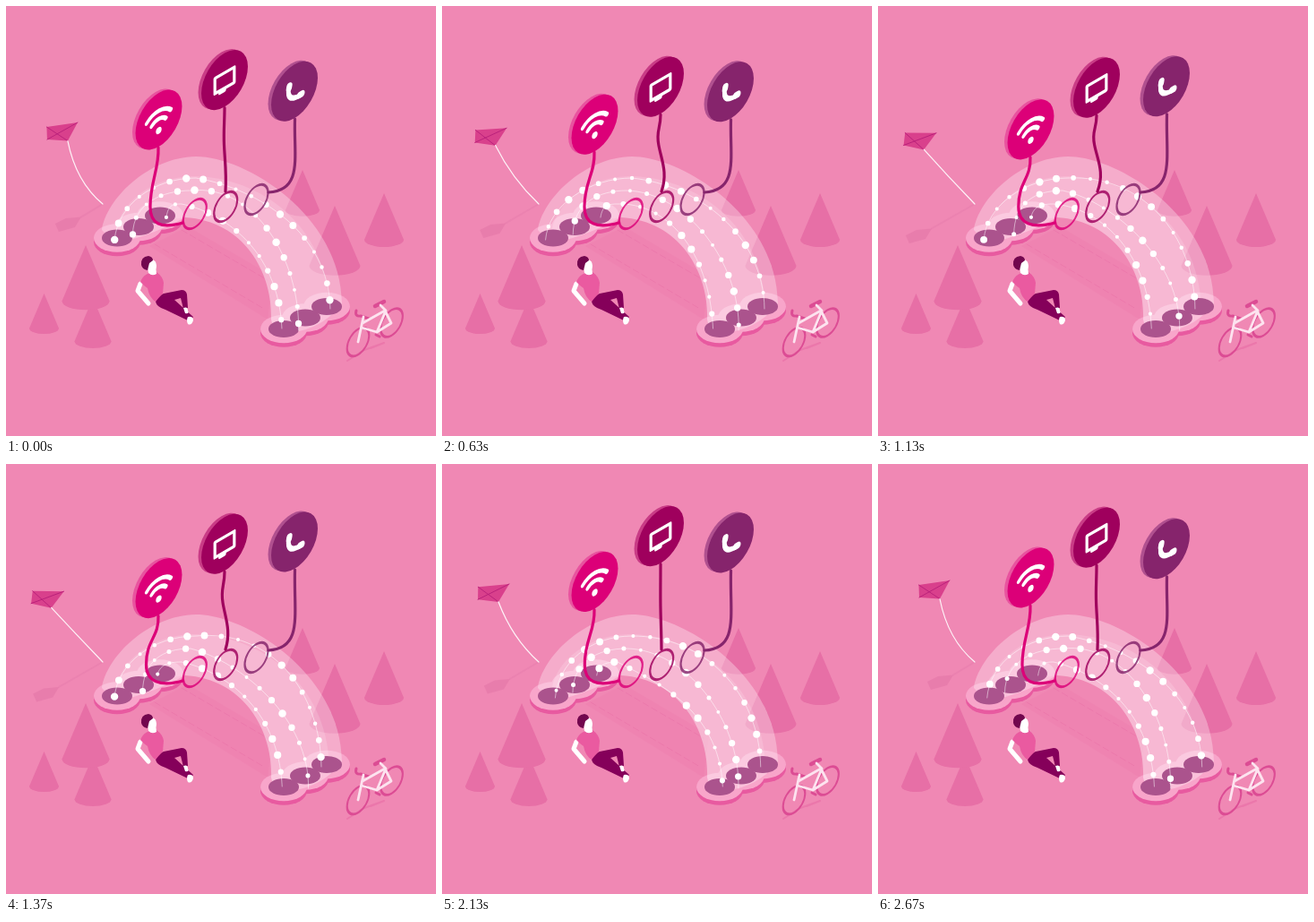
An HTML page for the animation above (2710 ms loop, 480 px wide and 480 px high).

```html
<!DOCTYPE html>
<html lang="en">
<head>
<meta charset="utf-8">
<title>Connected park</title>
<style>
html, body { margin: 0; width: 100%; height: 100%; overflow: hidden; background: #f088b4; }
svg { display: block; width: 100vw; height: 100vh; }
.line { fill: none; stroke-linecap: round; stroke-linejoin: round; }
.white { stroke: #fff; }
.tree { fill: #e76fa6; }
.cord { stroke-width: 3.2; }
</style>
</head>
<body>
<svg viewBox="0 0 480 480">
  <rect width="480" height="480" fill="#f088b4"/>
  <g id="trees"></g>

  <!-- ground shade -->
  <path d="M160 268L203 246L298 302L292 350Z" fill="#d9468f" opacity=".07"/>
  <path class="line" d="M196 250L292 306M166 266L288 338" stroke="#d9468f" stroke-dasharray="7 4" opacity=".16"/>

  <g id="rims"></g>

  <!-- tunnel -->
  <path fill="#fff" opacity=".3" d="M107 250C112 216 158 169 212 168C268 168 374 234 375 332Q350 366 300 366L296 350C298 298 266 240 200 236Q150 262 120 264Z"/>
  <path fill="#fff" opacity=".15" d="M122 259C122 224 160 190 212 190C284 192 358 245 361 336L300 366L296 350C298 298 266 240 200 236Q165 240 150 253Z"/>

  <g id="holes"></g>
  <g id="strands"></g>
  <g id="rings"></g>

  <!-- kite -->
  <g id="shade" fill="#e57aaa" opacity=".75"><path d="M55 243L67 237L84 235.500L77 247L59 252Z"/></g>
  <path id="shadeLine" class="line" stroke="#e57aaa" stroke-width="2" opacity=".45"/>
  <g id="kite">
    <path fill="#d9408c" d="M-14.500 -6L20 -11L9 9.500L-14 8Z"/>
    <path class="line" stroke="#b8207a" stroke-width=".9" d="M-14 8L20 -11M-14.500 -6L9 9.500"/>
  </g>
  <path id="twine" class="line white" stroke-width="1.2" opacity=".9"/>

  <g id="balloons"></g>

  <!-- person -->
  <g>
    <path class="line white" stroke-width="5" d="M150 310L147 318L159 332"/>
    <path fill="#85005a" d="M167 330Q170 321 181 320L196 317Q201 317 202 322L203 337L198 338L195 326L188 328L209 347L205 352L178 339Q168 336 167 330Z"/>
    <path fill="#ea5aa0" d="M150 308Q154 297 168 297Q175 302 176 309L175 321Q170 326 167 330Q160 326 158 315L154 312Z"/>
    <path fill="#fff" d="M158 291L167 290L168 299Q163 302 159 298Z"/>
    <ellipse cx="163" cy="290" rx="5" ry="6.800" fill="#fff"/>
    <path fill="#72074e" d="M151 289Q150 280 159 279Q164 280 164 284L160 287L158 295Q152 294 151 289Z"/>
    <path fill="#fff" d="M198 337Q203 335 203 340Q205 344 200 343ZM203 347Q209 346 209 351Q207 357 203 355Q201 351 203 347Z"/>
  </g>

  <!-- bike -->
  <path class="line" stroke="#d9468f" stroke-width="2" opacity=".25" d="M381 396L400 384L422 376L407 382"/>
  <g class="line" stroke="#dc4c94" stroke-width="2.5">
    <circle r="14.200" transform="matrix(.866 -.5 0 1 393 375)"/>
    <circle r="14.200" transform="matrix(.866 -.5 0 1 430.500 353.500)"/>
    <path d="M391 340Q389 347 396 346L405 349" stroke-width="3"/>
    <path d="M412 335L422 330" stroke-width="4.5"/>
    <path d="M413 367L417 369" stroke-width="3"/>
  </g>
  <path class="line" stroke="#fde3ef" stroke-width="2.8" d="M399 347L393 375M398 354L423 340M397 359L414 364L424 340L418 334M414 364L430 354L423 340"/>
</svg>

<script>
const LOOP = 2710, PITCH = 19, RUN = 6;
const ISO = 'matrix(.866 -.5 0 1 ';
const $ = id => document.getElementById(id);
const add = (id, markup) => $(id).insertAdjacentHTML('beforeend', markup);
const set = (id, d) => $(id).setAttribute('d', d);

// 1 at the peak time, -1 half a loop later
const wave = (t, peak) => Math.cos((t - peak) / LOOP * 2 * Math.PI);

function tree(x, y, w) {
  const base = y + 2.35 * w;
  add('trees', `<path class="tree" d="M${x} ${y}L${x + w} ${base}A${w} ${w * .38} 0 0 1 ${x - w} ${base}Z"/>`);
}
tree(331, 183, 19);
tree(367, 223, 28.5);
tree(422, 209, 22);
tree(97, 326, 20.5);
tree(89, 267, 26.5);
tree(42.5, 321, 16.5);

// a pit is three overlapping lobes on a slanted line
function lobes(id, x, y, grow, fill) {
  for (const n of [-1, 0, 1])
    add(id, `<ellipse cx="${x + n * 24}" cy="${y - n * 12.5}" rx="${17 + grow}" ry="${9.5 + grow * .7}" fill="${fill}"/>`);
}
function pit(x, y) {
  lobes('rims', x, y + 4.5, 9, '#e85aa0');
  lobes('rims', x, y, 9, '#f8a5ca');
  lobes('holes', x, y, 0, '#ab538d');
}
pit(148, 246.5);
pit(334, 348);

// Each strand rises from one pit, passes a crown and drops into the other.
// Both feet sway; bead sizes swell and shrink along the strand.
const strands = [
  { foot: [121, 261], rise: [124, 222], lead: 47, crown: [212, 192], top: [290, 194], drop: [356, 255], end: [357, 338],
    peaks: [2050, 200], swell: .3 },
  { foot: [147, 255], rise: [147, 220], lead: 31, crown: [206, 206], top: [270, 209], drop: [334, 285], end: [332, 362],
    peaks: [1370, 1370], swell: 5 },
  { foot: [174, 236], rise: [176, 222], lead: 10, crown: [196, 221], top: [240, 230], drop: [304, 270], end: [308, 360],
    peaks: [200, 2030], swell: 3.5 }
];
for (const s of strands) {
  const thread = `<path class="line white" stroke-width="1" opacity=".5"/>`;
  const beads = Array.from({ length: RUN }, (_, i) => {
    const size = 6.2 + 2.3 * Math.cos((i - s.swell) / RUN * 2 * Math.PI);
    return `<path class="line white" stroke-width="${size}" stroke-dasharray="0 ${RUN * PITCH}"/>`;
  });
  add('strands', `<g>${thread}${beads.join('')}</g>`);
  s.paths = [...$('strands').lastChild.children];
}

function strandPath(s, t) {
  const [a, b] = s.peaks.map(p => 5.5 * wave(t, p));
  const shift = ([x, y], dx, dy = 0) => [x + dx, y + dy];
  const [cx, cy] = s.crown;
  return `M${shift(s.foot, a)}C${shift(s.rise, a)} ${cx - s.lead} ${cy} ${s.crown}` +
    `C${shift(s.top, -1.5 * b, 2 * b)} ${shift(s.drop, b)} ${shift(s.end, b)}`;
}

function drawStrands(t) {
  const run = t / LOOP * 2 * RUN * PITCH;
  for (const s of strands) {
    const d = strandPath(s, t);
    s.paths.forEach((p, i) => {
      p.setAttribute('d', d);
      if (i) p.style.strokeDashoffset = -(run + (i - 1) * PITCH);
    });
  }
}

const arc = r => {
  const q = r * Math.SQRT1_2;
  return `M${-q} ${12 - q}A${r} ${r} 0 0 1 ${q} ${12 - q}`;
};
const stroke = (width, d) => `<path class="line white" stroke-width="${width}" d="${d}"/>`;
const wifi = stroke(4.8, arc(22) + arc(13)) + '<circle cy="12" r="3.700" fill="#fff"/>';
const screen = stroke(3.7, 'M-12.500 -8H12.500V9H-12.500Z') + stroke(4, 'M-6 11.500H0');
const phone = stroke(5.6, 'M-7 -9C-10 3 -4 9 9 8') + stroke(7.6, 'M-6.500 -9L-7 -6.500M7 7.500L9.500 7.500');

const balloons = [
  { x: 170.5, y: 132.8, peak: 1355, face: '#dc0078', side: '#e8539f', icon: wifi, ring: [210.8, 232],
    cord(y, k) {
      const left = 161 - 4.5 * k;
      return `M170 ${y}C171 ${y + 24} ${left} 196 ${left} 224C${left} 243 172 249 197.500 242`;
    } },
  { x: 244, y: 86, peak: 950, face: '#9f005d', side: '#c93c86', icon: screen, ring: [245.2, 224],
    cord: (y, k) => `M244 ${y}C244 ${y + 16} ${244 - 6 * k} 139 ${244 - 2.5 * k} 155C${244 + k} 172 ${244.5 + 9 * k} 186 245 207` },
  { x: 322, y: 91.2, peak: 350, face: '#86246c', side: '#b0508f', icon: phone, ring: [279.5, 216],
    cord: y => `M322.500 ${y}C321 168 332 206 293 208` }
];
balloons.forEach((b, i) => {
  const [rx, ry] = b.ring;
  add('rings', `<circle class="line" r="15" stroke="${b.face}" stroke-opacity=".82" stroke-width="2.600" transform="${ISO}${rx} ${ry})"/>`);
  add('balloons', `<path id="cord${i}" class="line cord" stroke="${b.face}"/>` +
    `<g id="balloon${i}"><circle r="30" fill="${b.side}" transform="${ISO}-3.500 -1)"/>` +
    `<g transform="${ISO}0 0)"><circle r="30" fill="${b.face}"/>${b.icon}</g></g>`);
});

function drawBalloons(t) {
  balloons.forEach((b, i) => {
    const w = wave(t, b.peak), y = b.y + 5.8 * w;
    $('balloon' + i).setAttribute('transform', `translate(${b.x} ${y})`);
    set('cord' + i, b.cord(y + 31, (1 + w) / 2));
  });
}

function drawKite(t) {
  const k = (1 + wave(t, 1300)) / 2;
  const x = 60 - 17 * k, y = 141 + 9 * k;
  $('kite').setAttribute('transform', `translate(${x} ${y}) rotate(${9 * k})`);
  $('shade').setAttribute('transform', `translate(${-25 * k} ${13.5 * k})`);
  set('shadeLine', `M${84 - 25 * k} ${235.5 + 13.5 * k}L108 221`);
  set('twine', `M${x + 9 - 1.5 * k} ${y + 9.5 + k}Q${78 + k} ${196 - 5 * k} 108 221`);
}

function frame(now) {
  const t = now % LOOP;
  drawStrands(t);
  drawBalloons(t);
  drawKite(t);
  requestAnimationFrame(frame);
}
frame(performance.now());
</script>
</body>
</html>
```
